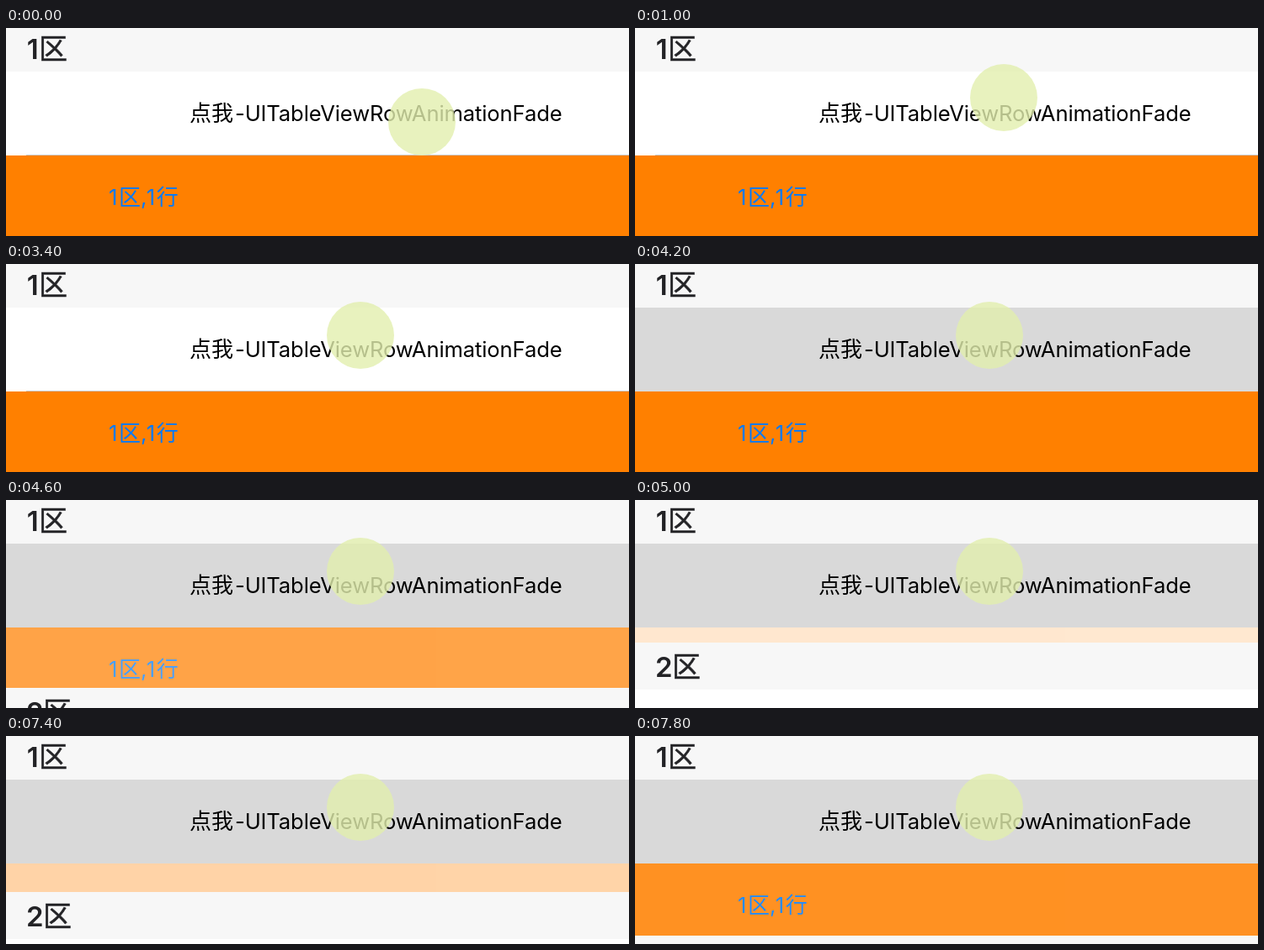
Animation of 740 by 248 pixels, one loop 8000 ms. Source, as an HTML page:

```html
<!DOCTYPE html>
<html lang="zh">
<head>
<meta charset="utf-8">
<title>Row animation</title>
<style>
  html, body { margin: 0; width: 100%; height: 100%; overflow: hidden; background: #fff; }
  svg { display: block; }
  text { font: 400 26px "Noto Sans CJK SC", "Noto Sans CJK", sans-serif; white-space: pre; }
  tspan { font-family: Inter, "Liberation Sans", sans-serif; font-size: 25.6px; letter-spacing: -.12px; }
  .head { font-size: 34px; font-weight: 500; fill: #232326; stroke: #232326; stroke-width: .5px; }
  .head tspan { font-size: 33px; font-weight: 600; stroke: none; letter-spacing: 0; }
  .link { fill: #007aff; }
  .link tspan { letter-spacing: 1.6px; }
</style>
</head>
<body>
<svg width="740" height="248" viewBox="0 0 740 248">
  <rect width="740" height="248" fill="#fff"/>

  <g id="row">
    <rect y="152" width="740" height="100" fill="#ff8000"/>
    <text class="link" x="122" y="211"><tspan>1</tspan>区<tspan>,1</tspan>行</text>
  </g>

  <g id="next">
    <rect width="740" height="256" fill="#fff"/>
    <rect width="740" height="56" fill="#f7f7f7"/>
    <text class="head" x="24 44" y="41"><tspan>2</tspan>区</text>
    <text x="217" y="115">点我<tspan dx="2">-UITableViewRowAnimationRight</tspan></text>
  </g>

  <rect width="740" height="52" fill="#f7f7f7"/>
  <text class="head" x="24.8 39" y="37"><tspan>1</tspan>区</text>
  <rect id="line" x="24" y="151" width="716" height="1" fill="#c8c7cc"/>
  <rect id="pressed" y="52" width="740" height="100" fill="#d9d9d9"/>
  <text x="218" y="111">点我<tspan dx="2">-UITableViewRowAnimationFade</tspan></text>

  <circle id="touch" r="40" fill="#e3efae" fill-opacity=".8"/>
</svg>
<script>
  const LOOP = 8000, STEP = 200;
  const PRESS = 4200, CLOSE = 4163, OPEN = 6918, DURATION = 1190;

  // Touch path: time, x, y
  const path = [
    [200, 494, 112], [400, 488, 108], [600, 470, 98], [800, 450, 88],
    [1000, 438, 83], [1200, 434, 82], [1400, 434, 82], [1600, 434.5, 84],
    [1800, 436, 88], [2000, 435, 90], [2600, 427.5, 89], [2800, 424, 87],
    [3000, 421, 85.5], [3200, 421, 85.5], [3400, 421, 85]
  ];

  const $ = id => document.getElementById(id);
  const row = $("row"), next = $("next"), line = $("line");
  const pressed = $("pressed"), touch = $("touch");

  // Cubic bezier (.42, 0, .58, 1)
  function easeInOut(x) {
    if (x <= 0) return 0;
    if (x >= 1) return 1;
    let lo = 0, hi = 1;
    for (let i = 0; i < 24; i++) {
      const s = (lo + hi) / 2, r = 1 - s;
      if (1.26 * r * r * s + 1.74 * r * s * s + s * s * s < x) lo = s;
      else hi = s;
    }
    return lo * lo * (3 - 2 * lo);
  }

  function touchAt(t) {
    const i = path.findIndex(p => p[0] >= t);
    if (i < 0) return path[path.length - 1].slice(1);
    if (i === 0) return path[0].slice(1);
    const [t0, x0, y0] = path[i - 1], [t1, x1, y1] = path[i];
    const k = (t - t0) / (t1 - t0);
    return [x0 + (x1 - x0) * k, y0 + (y1 - y0) * k];
  }

  function draw(t) {
    const open = 1 - easeInOut((t - CLOSE) / DURATION) + easeInOut((t - OPEN) / DURATION);
    row.setAttribute("opacity", open);
    next.setAttribute("transform", `translate(0 ${152 + Math.round(100 * open)})`);

    const down = t >= PRESS;
    pressed.setAttribute("visibility", down ? "visible" : "hidden");
    line.setAttribute("visibility", down ? "hidden" : "visible");

    const [x, y] = touchAt(t);
    touch.setAttribute("cx", x);
    touch.setAttribute("cy", y);
  }

  // The picture advances in steps of a fifth of a second
  const start = performance.now();
  function tick() {
    const t = (performance.now() - start) % LOOP;
    draw(Math.floor(t / STEP) * STEP);
    requestAnimationFrame(tick);
  }
  draw(0);
  requestAnimationFrame(tick);
</script>
</body>
</html>
```
